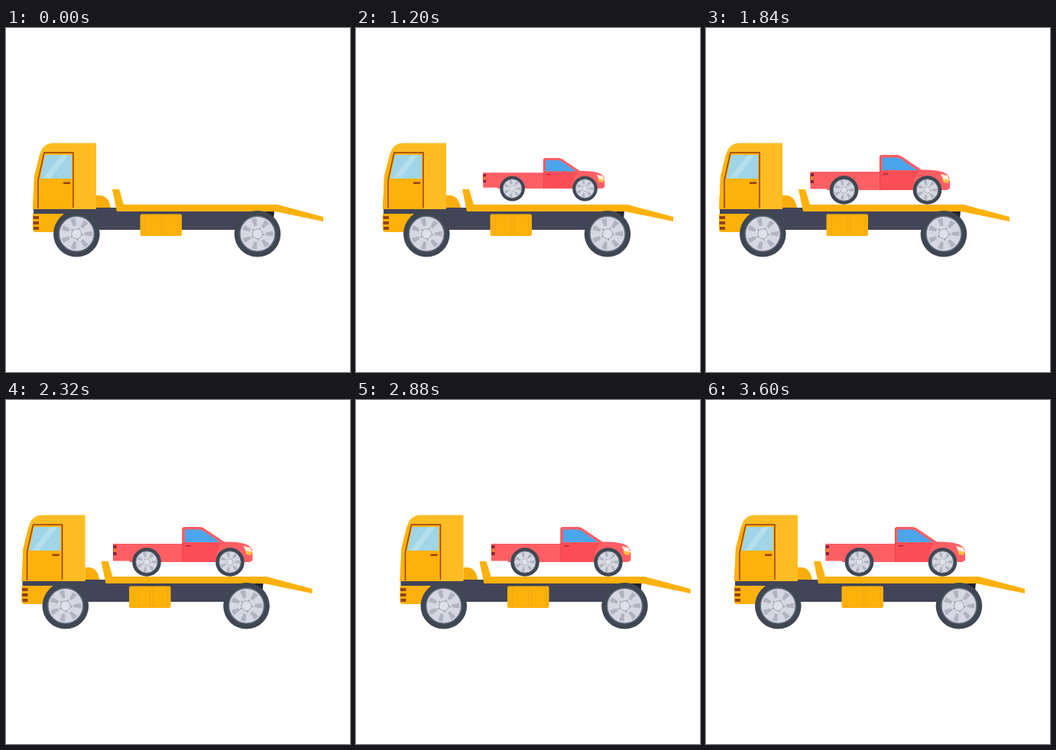
Recreate the animation shown at these times as an HTML page. Size 450 by 450 pixels, loop 3680 ms.

```html
<!DOCTYPE html>
<html>
<head>
<meta charset="utf-8">
<style>
  html, body { margin: 0; width: 100%; height: 100%; overflow: hidden; background: #fff; }
  svg { display: block; width: 100%; height: 100%; }
</style>
</head>
<body>
<svg viewBox="0 0 450 450">
  <defs>
    <g id="wheel">
      <circle r="30.3" fill="#3f4753"/>
      <circle r="23" fill="#d5d8e1" stroke="#667080" stroke-width="1.5"/>
      <circle r="15.5" fill="none" stroke="#b0b4c1" stroke-width="10" pathLength="14" stroke-dasharray=".75 1.25" stroke-dashoffset=".4"/>
      <circle r="10" fill="#d9dbe4"/>
      <circle r="6.5" fill="#dfe1e9" stroke="#9da1af"/>
      <circle r="8" fill="none" stroke="#9094a3" stroke-width="1.4" pathLength="10" stroke-dasharray=".4 1.6"/>
    </g>
    <clipPath id="pane"><path d="M51 166H86V197H44.500Z"/></clipPath>
  </defs>
  <g id="truck">
    <path d="M36 235H350V249H320V264H70V243H36Z" fill="#424557"/>
    <path d="M340 240H351L350 249H340Z" fill="#24252d"/>
    <path d="M118 219H124Q134 220 137 235H118Z" fill="#f9ad0c"/>
    <path d="M35 237L37 194L44 166Q48 150.500 62 150.500H118V237Z" fill="#fdbc22"/>
    <path d="M35 237L37 194L44 166L50 163H88V237Z" fill="#fcb10b"/>
    <path d="M35 243H76Q66 250 63 267H39Q35 267 35 263Z" fill="#fcb10b"/>
    <path d="M35.500 246H43V250H35.500ZM35.500 253H43V257H35.500ZM36 260H43V264H36Z" fill="#96420f"/>
    <path d="M42 236V199L50 163H88V235" fill="none" stroke="#963f0c" stroke-width="1.5"/>
    <path d="M75 201.500H84V204H75Z" fill="#963f0c"/>
    <g clip-path="url(#pane)">
      <path d="M40 160H90V200H40Z" fill="#9fd5e6"/>
      <path d="M74 164L47 199H56L83 164Z" fill="#b4dfeb"/>
    </g>
    <path d="M139 211H148L154 231H355L415 247V253L352 240H145Z" fill="#fcb10b"/>
    <rect x="175.500" y="243.500" width="54.500" height="28.500" rx="2" fill="#fcb10b"/>
    <path d="M182 244V272M203 244V272M207 244V272M226 244V272" stroke="#f0a80f"/>
    <use href="#wheel" x="92.300" y="269.300"/>
    <use href="#wheel" x="329" y="269.300"/>
    <g id="pickup">
      <path d="M154.500 188H245V169Q245 166 248 166H268Q271 166 274 168L300 185.500Q318 185 328 188.500Q337 192 337 200V210L333 212H176V210.500H154.500Z" fill="#fd5f65"/>
      <path d="M245 187H297Q289 196 288 212H245Z" fill="#fb4d56"/>
      <path d="M245.500 168V212" stroke="#e04350" stroke-width=".8"/>
      <path d="M248.500 169.500H268Q271 170 273 171.500L294.500 186H248.500Z" fill="#4ba5ec"/>
      <path d="M250 190H256V191.500H250Z" fill="#a52331"/>
      <path d="M154.500 190H159V203H154.500Z" fill="#8e2232"/>
      <path d="M155 194H159V199H155Z" fill="#f07b32"/>
      <path d="M325 191L334 193L337 200L329 199Z" fill="#fff0dc"/>
      <path d="M327 197L336 199L335 203L329 202Z" fill="#fdc13c"/>
      <use href="#wheel" transform="translate(198.500 212) scale(.62)"/>
      <use href="#wheel" transform="translate(307.500 212) scale(.62)"/>
    </g>
  </g>
</svg>
<script>
  const LOOP = 3680, STEP = 80;
  const truck = document.getElementById('truck');
  const pickup = document.getElementById('pickup');

  // [time, value] keys, joined by straight lines
  const scaleKeys = [[0, 0], [720, 1.14], [1180, 0.855], [1360, 1], [LOOP, 1]];
  const shiftKeys = [[0, 0], [1360, 0], [2112, -28.2], [3036, 32.8], [3636, 0], [LOOP, 0]];

  function valueAt(keys, t) {
    const i = keys.findIndex(key => key[0] > t);
    const [t0, a] = keys[i - 1], [t1, b] = keys[i];
    return a + (b - a) * (t - t0) / (t1 - t0);
  }

  function draw() {
    const t = Math.floor(performance.now() % LOOP / STEP) * STEP;
    truck.setAttribute('transform', `translate(${valueAt(shiftKeys, t)} 0)`);
    pickup.setAttribute('transform',
      `translate(245.5 197) scale(${valueAt(scaleKeys, t)}) translate(-245.5 -197)`);
    requestAnimationFrame(draw);
  }
  draw();
</script>
</body>
</html>
```
